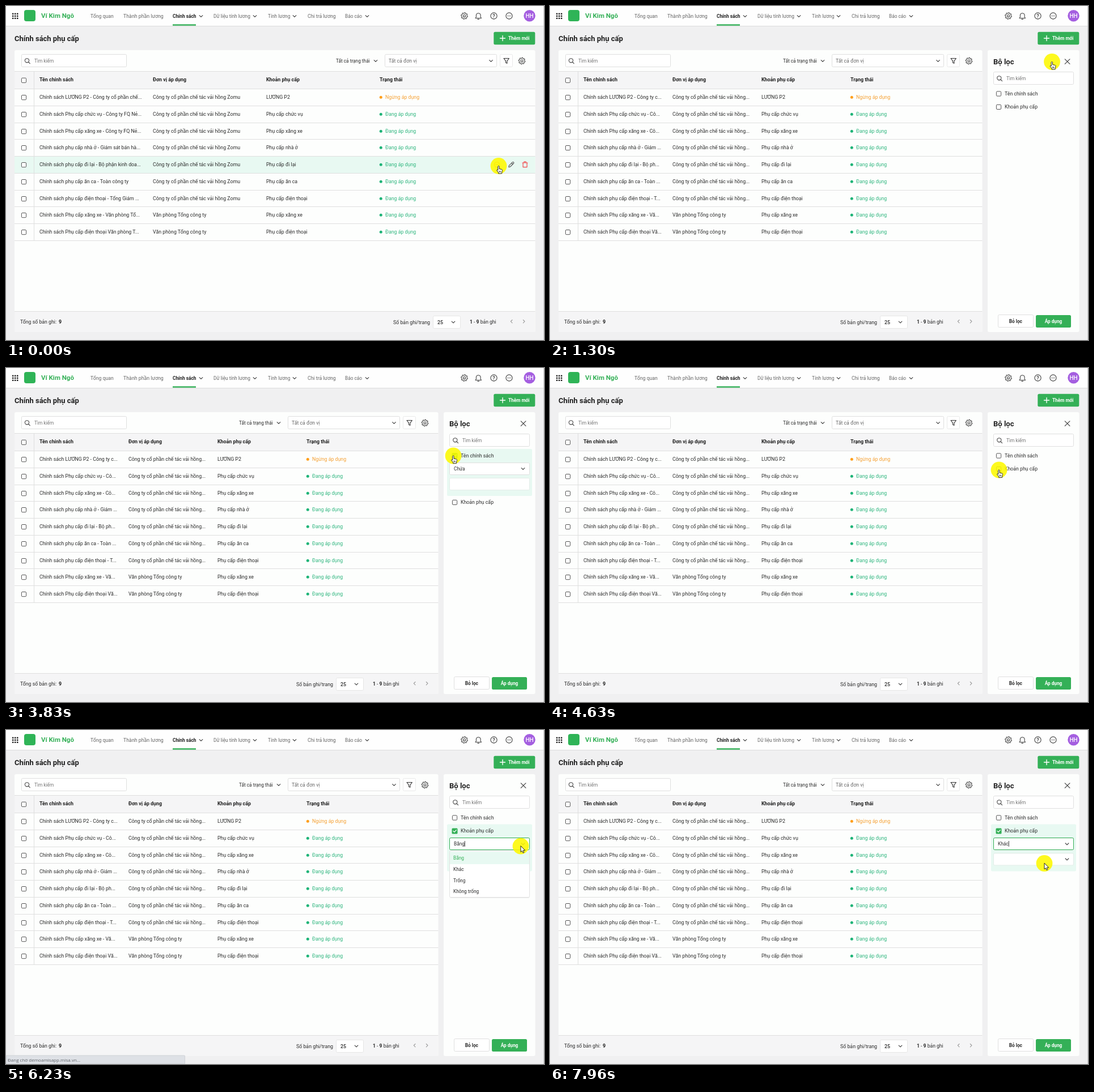
These frames come from a looping animation (949 px wide and 590 px high, 8000 ms). An HTML page:

```html
<!DOCTYPE html>
<html lang="vi">
<head>
<meta charset="utf-8">
<title>Chính sách phụ cấp</title>
<style>
html, body { margin: 0; width: 100%; height: 100%; overflow: hidden; background: #f0f0f1; }
svg { display: block; width: 949px; height: 590px; font-family: Roboto, sans-serif; }
</style>
</head>
<body>
<svg id="stage" viewBox="0 0 949 590"></svg>
<script>
const GREEN = '#34b057', MINT = '#e8f9f2', INK = '#2b2b2b', GREY = '#666', LINE = '#dfdfdf';
const CARD = '#fdfefd', LOOP = 8000, SHIFT = -171, HOVER_LAG = 140;

// drawing helpers
const rect = (x, y, w, h, fill, stroke = 'none', r = 0) =>
  `<rect x="${x}" y="${y}" width="${w}" height="${h}" rx="${r}" fill="${fill}" stroke="${stroke}"/>`;
const text = (x, y, s, size = 8.8, fill = INK, weight = 400, anchor = 'start') =>
  `<text x="${x}" y="${y}" font-size="${size}" fill="${fill}" font-weight="${weight}" text-anchor="${anchor}">${s}</text>`;
const bold = (x, y, s, size = 8.85, fill = '#1f1f1f', anchor) => text(x, y, s, size, fill, 700, anchor);
const path = (d, stroke = '#444', w = 1.1, fill = 'none') =>
  `<path d="${d}" fill="${fill}" stroke="${stroke}" stroke-width="${w}" stroke-linecap="round" stroke-linejoin="round"/>`;
const dot = (x, y, r, fill, stroke = 'none', w = 1.1) =>
  `<circle cx="${x}" cy="${y}" r="${r}" fill="${fill}" stroke="${stroke}" stroke-width="${w}"/>`;
const group = (id, body, attrs = '') => `<g id="${id}" ${attrs}>${body}</g>`;

const chevron = (x, y) => path(`M${x - 2.8} ${y - 1.4}l2.8 2.8l2.8-2.8`, '#444', 1.2);
const search = (x, y) => dot(x, y, 3.6, 'none', '#444') + path(`M${x + 2.7} ${y + 2.7}l2.6 2.6`);
const box = (x, y, w, h, stroke = LINE) => rect(x + .5, y + .5, w, h, '#fff', stroke, 2);
const check = (x, y, on) => on
  ? rect(x - 5, y - 5, 10, 10, GREEN, 'none', 1.5) + path(`M${x - 2.6} ${y}l2 2l3.4-3.8`, '#fff', 1.3)
  : rect(x - 4.1, y - 4.1, 8.2, 8.2, '#fff', '#555', 1.5);

function gear(x, y) {
  const pts = [];
  for (let i = 0; i < 32; i++) {
    const a = (i + .5) / 32 * Math.PI * 2, r = i % 4 < 2 ? 5.8 : 4.6;
    pts.push(`${(x + r * Math.cos(a)).toFixed(2)} ${(y + r * Math.sin(a)).toFixed(2)}`);
  }
  return path('M' + pts.join('L') + 'Z') + dot(x, y, 2, 'none', '#444');
}

const rowTop = i => Math.round(146 + 29.76 * i);

function header() {
  let s = rect(0, 0, 949, 35, '#fefefe') + rect(0, 35, 949, 1, '#dcdcdc') + rect(948, 0, 1, 590, '#d0d0d0');
  for (let i = 0; i < 9; i++) s += rect(11 + i % 3 * 4, 12.5 + (i / 3 | 0) * 4, 2.5, 2.5, '#222', 'none', .6);
  s += rect(32, 7, 20, 20, '#2fb457', 'none', 4) + bold(62, 21.3, 'Ví Kim Ngô', 11.5, GREEN);
  s += text(149, 20.8, 'Tổng quan', 8.7, GREY) + text(207, 20.8, 'Thành phần lương', 8.8, GREY);
  s += bold(294, 21.2, 'Chính sách', 8.3) + rect(294, 32.3, 41, 2.4, GREEN);
  s += text(532, 20.8, 'Chi trả lương', 8.75, GREY);
  [[366, 'Dữ liệu tính lương', 439], [462, 'Tính lương', 509], [598, 'Báo cáo', 637]]
    .forEach(([x, label, c]) => s += text(x, 21.2, label, 8.3, GREY) + chevron(c, 18));
  s += chevron(344, 18) + gear(808.5, 17.5);
  s += path('M828 21.5h10.5l-1.4-2v-3.4a3.9 3.9 0 0 0-7.7 0v3.4zM831.8 23.4h2.8');
  s += dot(860.5, 17.5, 5.6, 'none', '#444') + text(860.5, 20.7, '?', 9, '#333', 500, 'middle');
  s += dot(887.5, 17.5, 5.6, 'none', '#444');
  [-2.5, 0, 2.5].forEach(d => s += dot(887.5 + d, 17.5, .75, '#444'));
  s += dot(923.5, 17.3, 10.2, '#a45ee0') + text(923.5, 20.9, 'HH', 10, '#fff', 500, 'middle');
  s += bold(15, 61.5, 'Chính sách phụ cấp', 12.95);
  s += rect(860.3, 45.8, 73, 22.4, GREEN, 'none', 2.5) + path('M871.5 57h9M876 52.5v9', '#fff', 1.4);
  return s + bold(886, 60.2, 'Thêm mới', 8.25, '#fff');
}

const COMPANY = 'Công ty cổ phần chế tác vải hồng', OFFICE = 'Văn phòng Tổng công ty';
// wide name, narrow name, allowance
const ROWS = [
  ['LƯƠNG P2 - Công ty cổ phần chế...', 'LƯƠNG P2 - Công ty c...', 'LƯƠNG P2'],
  ['Phụ cấp chức vụ - Công ty FQ Nẻ...', 'Phụ cấp chức vụ - Cô...', 'Phụ cấp chức vụ'],
  ['Phụ cấp xăng xe - Công ty FQ Nẻ...', 'Phụ cấp xăng xe - Cô...', 'Phụ cấp xăng xe'],
  ['phụ cấp nhà ở - Giám sát bán hà...', 'phụ cấp nhà ở - Giám ...', 'Phụ cấp nhà ở'],
  ['phụ cấp đi lại - Bộ phận kinh doa...', 'phụ cấp đi lại - Bộ ph...', 'Phụ cấp đi lại'],
  ['phụ cấp ăn ca - Toàn công ty', 'phụ cấp ăn ca - Toàn ...', 'Phụ cấp ăn ca'],
  ['phụ cấp điện thoại - Tổng Giám ...', 'phụ cấp điện thoại - T...', 'Phụ cấp điện thoại'],
  ['Phụ cấp xăng xe - Văn phòng Tổ...', 'Phụ cấp xăng xe - Vă...', 'Phụ cấp xăng xe'],
  ['Phụ cấp điện thoại Văn phòng T...', 'Phụ cấp điện thoại Vă...', 'Phụ cấp điện thoại']
];

function hoverRow() {
  return rect(15, 1, 918.5, 29, MINT)
    + dot(866, 15.2, 4.6, 'none', '#ff9f1c', 1.3) + path('M863.8 15.2h4.4', '#ff9f1c', 1.3)
    + path('M886.8 19.6l.5-2.7l6-6a1.3 1.3 0 0 1 2.1 2.1l-6 6zM891.8 12.4l2.1 2.1', '#555')
    + path('M911 12h9M913.8 11.8v-1.6h3.4v1.6M912 12.2v7.4h7v-7.4', '#f0484c', 1.2);
}

function table(wide) {
  const dx = wide ? 0 : SHIFT, w = 918.5 + dx;
  const cols = wide ? [59, 259, 459, 659] : [59, 216, 373, 530];
  let s = rect(15, 78, w, 498, CARD, 'none', 3);
  s += rect(15, 116, w, 30, '#f5f5f6') + rect(15, 115, w, 1, LINE);
  if (wide) s += group('hover', hoverRow());
  s += rect(15, 540, w, 36, '#f5f5f6') + rect(15, 539, w, 1, LINE) + rect(49, 116, 1, 298, LINE);
  for (let i = 0; i < 10; i++) s += rect(15, rowTop(i), w, 1, LINE);
  ['Tên chính sách', 'Đơn vị áp dụng', 'Khoản phụ cấp', 'Trạng thái']
    .forEach((h, i) => s += bold(cols[i], 133.2, h));
  s += check(31.5, 131.3);
  ROWS.forEach((row, i) => {
    const y = rowTop(i) + 15.2, b = y + 3, off = i === 0;
    const unit = i > 6 ? OFFICE : COMPANY + (wide ? ' Zomu' : '...');
    s += check(31.5, y + .4) + text(cols[0], b, 'Chính sách ' + row[wide ? 0 : 1]);
    s += text(cols[1], b, unit) + text(cols[2], b, row[2]);
    s += dot(cols[3] + 2.3, y, 2.5, off ? '#ff9f1c' : '#1fb478');
    s += text(cols[3] + 10, b, off ? 'Ngừng áp dụng' : 'Đang áp dụng', 8.8, off ? '#f5a033' : '#2fb67f');
  });
  s += box(27, 85, 185, 22) + search(37, 96.3) + text(50, 99.8, 'Tìm kiếm', 8.3, '#757575');
  s += text(25, 561, 'Tổng số bản ghi:', 8.75) + bold(93, 561, '9');
  return s + `<g transform="translate(${dx})">`
    + text(582, 100, 'Tất cả trạng thái', 8.3) + chevron(652, 97)
    + box(668, 85, 197, 22) + text(675, 99.6, 'Tất cả đơn vị', 8.75, GREY) + chevron(855.5, 97)
    + box(871, 85, 22, 22, '#e9e9e9') + path('M878 92.5h9.4l-3.5 4.6v4.2l-2.4-1.4v-2.8z', '#333') + gear(910, 97)
    + text(683, 561.6, 'Số bản ghi/trang') + box(753, 547, 48, 22, '#e6e6e6')
    + text(761, 561.8, '25', 8.8, INK, 500) + chevron(789, 558.5)
    + text(818, 561, '<tspan font-weight="700">1</tspan> - <tspan font-weight="700">9</tspan> bản ghi', 8.6)
    + path('M893 554.5l-2.7 2.7l2.7 2.7M912.3 554.5l2.7 2.7l-2.7 2.7', '#999')
    + '</g>';
}

const item = (y, label, on) => check(791.5, y, on) + text(802, y + 2.8, label, 8.75);
// checked filter block: tinted back, condition select, value field
const block = (y, label, value, list) =>
  rect(778, y - 12, 150, 83, MINT, 'none', 2) + item(y, label, true)
  + box(782, y + 12, 141, 21) + text(790, y + 26, value, 8.3) + chevron(912, y + 23)
  + box(782, y + 39, 141, 21, '#e3ece8') + (list ? chevron(912, y + 50) : '');

const NAME = 'Tên chính sách', KIND = 'Khoản phụ cấp';
const OPTIONS = ['Bằng', 'Khác', 'Trống', 'Không trống'];

function panel() {
  let s = rect(772, 78, 161.5, 498, CARD, 'none', 3) + bold(782, 102.5, 'Bộ lọc', 13);
  s += path('M908.3 93.8l8.6 8.6M916.9 93.8l-8.6 8.6', '#444', 1.2);
  s += box(782, 116, 141, 22) + search(792.3, 127.3) + text(805, 130.8, 'Tìm kiếm', 8.3, '#757575');
  s += box(790, 545, 62, 22) + bold(821.3, 560.4, 'Bỏ lọc', 8.3, INK, 'middle');
  s += rect(857, 546, 62, 22, GREEN, 'none', 2.5) + bold(888, 560.4, 'Áp dụng', 8.2, '#fff', 'middle');
  s += group('closed', item(155, NAME) + item(178.4, KIND));
  s += group('nameOpen', block(155, NAME, 'Chứa') + item(237.4, KIND));
  s += group('kindOpen', item(155, NAME) + block(178.4, KIND, '', true)
    + '<text id="value" x="790" y="204.2" font-size="8.3" fill="#2b2b2b"></text>');
  s += group('focus', rect(782.5, 190.5, 141, 21, 'none', GREEN, 2) + rect(808.8, 196, .9, 10, '#222'));
  let menu = rect(783, 215, 140.5, 82, '#000', 'none', 2).replace('/>', ' opacity=".07"/>')
    + rect(782.5, 213.5, 141, 82, '#fff', '#e2e2e2', 2) + rect(783, 215, 140, 22, MINT)
    + group('pick', rect(783, 0, 140, 19.8, '#eef8f3'));
  OPTIONS.forEach((o, i) => menu += text(789, 229 + 19.8 * i, o, 8.3, i ? INK : GREEN));
  return s + group('menu', menu);
}

const stage = document.getElementById('stage');
stage.innerHTML = rect(0, 0, 949, 590, '#f0f0f1') + header()
  + group('wide', table(true)) + group('narrow', table(false) + panel())
  + group('status', rect(0, 575, 315.5, 15, '#dee1e6', '#cfd2d6', 1)
    + text(3, 586.4, 'Đang chờ demoamisapp.misa.vn...', 8, '#60646a').replace('<text', '<text font-family="Open Sans, sans-serif"'))
  + '<path id="mark" d="M866 78.5V113.2H898.6V78.5Z" pathLength="100" stroke-dasharray="100 100" fill="none" stroke="#f00" stroke-width="2.6"/>'
  + group('pointer', dot(0, 0, 14.4, '#fdf800').replace('/>', ' opacity=".88"/>')
    + group('arrow', path('M0 0V10.4L2.4 8.3L4.1 12L5.8 11.2L4.2 7.6H7.4Z', '#111', .9, '#fff'))
    + group('hand', path('M-1.4 1.2C-1.4-.5 1-.5 1 1.2V5.2L5.2 6C6.3 6.3 6.6 7 6.4 8.1L5.6 11V13.4H-.4V11.6L-3.1 8.3C-3.9 7-2.5 6-1.4 7.4ZM3.1 9v2M1.2 9v2', '#111', .9, '#fff')));

const $ = id => document.getElementById(id);
const show = (id, on) => $(id).setAttribute('visibility', on ? 'inherit' : 'hidden');
const within = (t, spans) => spans.some(([a, b]) => t >= a && t < b);

// time, x, y
const TRACK = [
  [0, 869, 282.5], [30, 869, 282.5], [300, 869, 238], [500, 870, 172], [600, 870.7, 142],
  [740, 877, 112], [830, 883, 102.5], [860, 884, 102], [930, 885.5, 98.5],
  [2200, 885.5, 98.5], [2350, 878, 106], [2600, 838, 140], [2860, 804.5, 166.5], [3000, 803.5, 168],
  [3030, 803.5, 168], [3260, 789, 155], [3830, 789, 155], [3930, 790, 154],
  [4130, 790, 154], [4360, 791.5, 178.5], [4560, 791.5, 178.5], [4630, 792, 180],
  [5200, 792, 180], [5300, 818, 185], [5460, 885, 201], [5560, 908, 205],
  [6230, 908, 205], [6400, 900, 222], [6700, 872, 250], [7030, 862, 262],
  [7260, 862, 262], [7360, 858, 248], [7660, 858, 248], [7960, 872, 235.5], [8000, 872, 235.5]
];

function place(t) {
  const i = TRACK.findIndex(k => k[0] > t), [a, x, y] = TRACK[i - 1], [b, u, v] = TRACK[i];
  const p = (t - a) / (b - a);
  return [x + (u - x) * p, y + (v - y) * p];
}

function draw(t) {
  const [x, y] = place(t);
  $('pointer').setAttribute('transform', `translate(${x} ${y})`);
  const hand = within(t, [[0, 90], [800, 2260], [3180, 4190], [4330, 5230], [6500, 7700]]);
  show('hand', hand);
  show('arrow', !hand);

  const open = t >= 1260;
  show('wide', !open);
  show('narrow', open);

  // row highlight trails the pointer
  const row = Math.floor((place(Math.max(0, t - HOVER_LAG))[1] - 146) / 29.76);
  show('hover', !open && row >= 0);
  if (!open) $('hover').setAttribute('transform', `translate(0 ${rowTop(row)})`);

  const drawn = Math.min(1, Math.max(0, (t - 370) / 300));
  show('mark', drawn > 0 && !open);
  $('mark').setAttribute('stroke-dashoffset', 100 * (1 - drawn));

  const nameOpen = t >= 3560 && t < 4130, kindOpen = t >= 4930, picked = t >= 7660;
  show('nameOpen', open && nameOpen);
  show('kindOpen', open && kindOpen);
  show('closed', open && !nameOpen && !kindOpen);
  $('value').textContent = OPTIONS[picked ? 1 : 0];
  show('focus', t >= 5730);

  const menu = t >= 5800 && !picked, pick = Math.floor((y - 236) / 19.8);
  show('menu', menu);
  show('pick', menu && pick >= 0);
  $('pick').setAttribute('transform', `translate(0 ${236 + 19.8 * pick})`);
  show('status', within(t, [[5830, 6530]]));
}

const start = performance.now();
function tick() {
  draw((performance.now() - start) % LOOP);
  requestAnimationFrame(tick);
}
tick();
</script>
</body>
</html>
```
